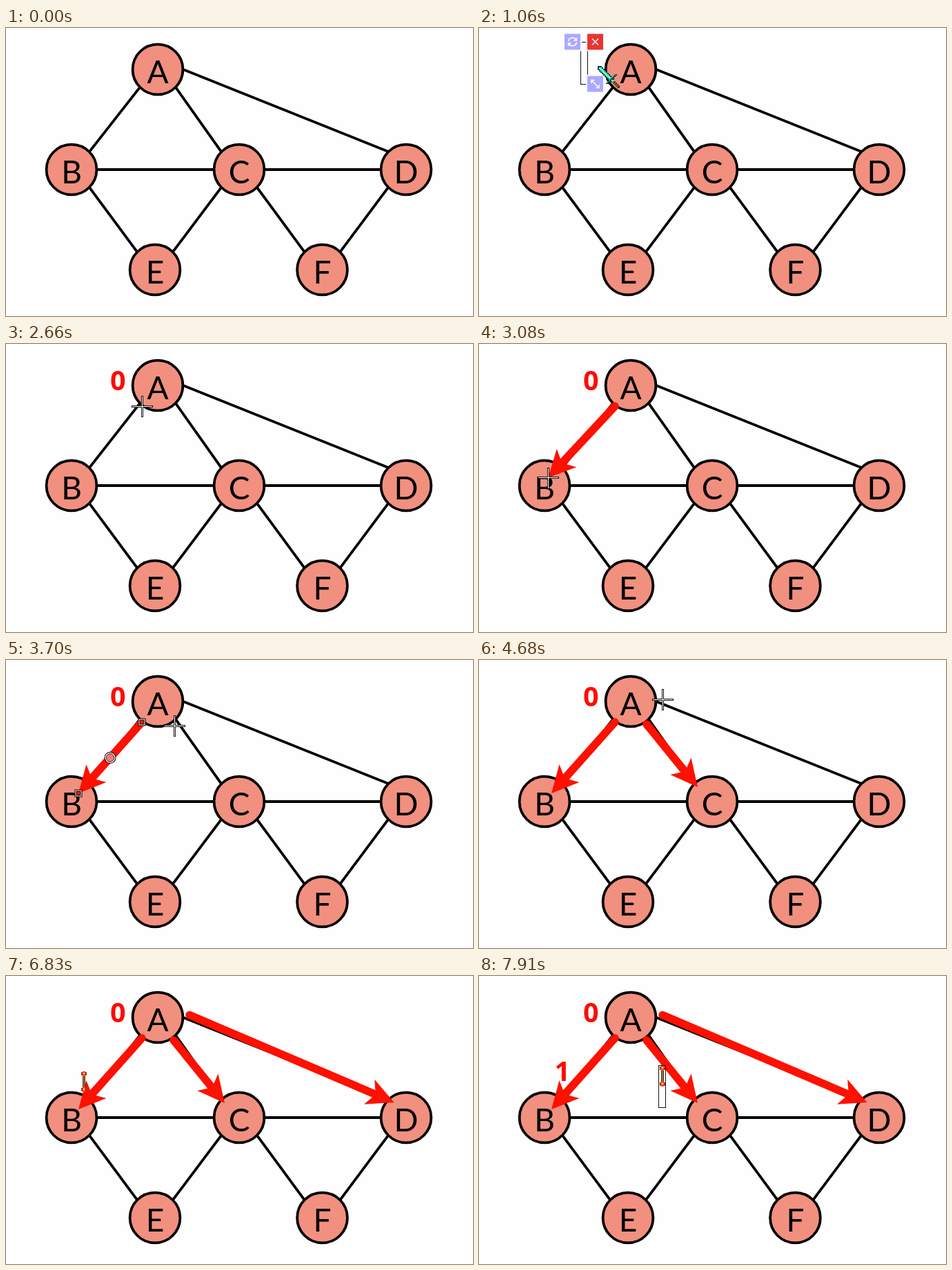
An HTML page for the animation above (8000 ms loop, 677 by 417 pixels).

```html
<!DOCTYPE html>
<html lang="en">
<head>
<meta charset="utf-8">
<title>Graph traversal</title>
<style>
  html, body { margin: 0; width: 100%; height: 100%; overflow: hidden; background: #fefefe; }
  svg { display: block; width: 677px; height: 417px; }
  .edge { stroke: #000; stroke-width: 3.8; }
  .node { fill: #f1907f; stroke: #000; stroke-width: 3.8; }
  .name { font: 46px Lato, "Open Sans", sans-serif; text-anchor: middle; }
  .digit { font: bold 39.5px "Open Sans", "Noto Sans", sans-serif; fill: #ff0a00; }
  .arrow { fill: #ff1000; stroke: none; }
  .shaft { stroke: #ff1000; stroke-width: 11.5; stroke-linecap: round; }
  .frame { fill: none; stroke: #111; shape-rendering: crispEdges; }
  .pixel { shape-rendering: crispEdges; }
  .glyph { fill: none; stroke: #fff; stroke-width: 1.5; }
</style>
</head>
<body>
<svg viewBox="0 0 677 417">
  <g id="graph"></g>
  <g id="arrows"></g>
  <g id="labels"></g>
  <g id="boxes"></g>
  <g id="grips"></g>
  <g id="cursors"></g>
</svg>
<script>
const LOOP = 8000;
const byId = id => document.getElementById(id);

function add(parent, tag, attrs = {}, text = '') {
  const el = document.createElementNS('http://www.w3.org/2000/svg', tag);
  set(el, attrs);
  el.textContent = text;
  return parent.appendChild(el);
}
function set(el, attrs) {
  for (const key in attrs) el.setAttribute(key, attrs[key]);
}
const show = (el, on) => { el.style.display = on ? '' : 'none'; };
const within = (t, [from, to]) => t >= from && t < to;
const move = (el, x, y) => el.setAttribute('transform', `translate(${x} ${y})`);

// Position on a track of [time, x, y] points, or null outside it
function along(track, t) {
  for (let i = 1; i < track.length; i++) {
    const [t0, x0, y0] = track[i - 1], [t1, x1, y1] = track[i];
    if (t >= t0 && t < t1) {
      const k = (t - t0) / (t1 - t0);
      return [x0 + (x1 - x0) * k, y0 + (y1 - y0) * k];
    }
  }
  return null;
}

// Graph
const nodes = {
  A: [220, 60], B: [95, 205], C: [338, 205],
  D: [580, 205], E: [216, 350], F: [458.5, 350]
};
// Each edge: node, side, node, side
const edges = [
  ['A', [-1, 1], 'B', [1, -1]], ['A', [1, 1], 'C', [-1, -1]],
  ['A', [1.4, 0], 'D', [-1, -1]], ['B', [1.4, 0], 'C', [-1.4, 0]],
  ['C', [1.4, 0], 'D', [-1.4, 0]], ['B', [1, 1], 'E', [-1, -1]],
  ['C', [-1, 1], 'E', [1, -1]], ['C', [1, 1], 'F', [-1, -1]],
  ['D', [-1, 1], 'F', [1, -1]]
];
const rim = (id, side) => nodes[id].map((v, i) => v + 26.3 * side[i]);
for (const [a, sideA, b, sideB] of edges) {
  const [x1, y1] = rim(a, sideA), [x2, y2] = rim(b, sideB);
  add(byId('graph'), 'line', { class: 'edge', x1, y1, x2, y2 });
}
for (const id in nodes) {
  const [cx, cy] = nodes[id];
  add(byId('graph'), 'circle', { class: 'node', cx, cy, r: 36.4 });
  add(byId('graph'), 'text', { class: 'name', x: cx, y: cy + 19.5 }, id);
}

// Cursor tracks
const crossTrack = [
  [2140, 243, 385], [2400, 220, 200], [2560, 192, 97], [2620, 197, 90],
  [2700, 197, 90], [2940, 97, 194], [3230, 104, 193], [3410, 105, 194],
  [3600, 230, 71], [3700, 244, 95], [3750, 244, 95], [4200, 318, 188],
  [4250, 317, 184], [4350, 317, 184], [4560, 263, 34], [4670, 266, 57],
  [4720, 266, 57], [5050, 538, 170], [5290, 562, 183], [5520, 562, 183]
];
const leaveTrack = [[5560, 562, 183], [5700, 564, 354]];
const sizeTrack = [[5520, 562, 183], [5560, 562, 183]];
const beamTracks = [
  [[130, 73, 400], [450, 128, 185], [700, 166, 26], [780, 148, 21], [940, 148, 21]],
  [[6460, 116, 373], [6880, 107, 107], [7350, 107, 107]],
  [[7700, 236, 134], [7850, 264, 130], [7905, 261, 130], [LOOP, 261, 130]]
];
const swordTracks = [
  [[940, 150, 34], [1040, 172, 55], [1080, 172, 55], [1350, 204, 118],
   [1550, 256, 290], [1720, 262, 410]],
  [[7350, 108, 108], [7480, 122, 116], [7700, 234, 136]]
];

// Drawn arrows with their selection grips
const arrows = [
  { from: [197, 90], to: [105, 193], drag: [2700, 3230], picked: [3410, 3740] },
  { from: [243, 93], to: [317, 184], drag: [3750, 4250], picked: [4270, 4660] },
  { from: [266, 56.5], to: [562.5, 183], drag: [4720, 5290], picked: [5520, 6470] }
];
function grip(parent, x, y) {
  const g = add(parent, 'g', { transform: `translate(${x} ${y})` });
  add(g, 'rect', { x: -5.5, y: -5.5, width: 11, height: 11 });
  add(g, 'rect', { x: -4.5, y: -4.5, width: 9, height: 9, fill: '#fff' });
  add(g, 'rect', { x: -3, y: -3, width: 6, height: 6, fill: '#e02018', stroke: '#000' });
}
for (const a of arrows) {
  a.el = add(byId('arrows'), 'g');
  a.shaft = add(a.el, 'line', { class: 'shaft', x1: a.from[0], y1: a.from[1] });
  a.head = add(a.el, 'path', { class: 'arrow', d: 'M0 0L-39 -19.5L-29 0L-39 19.5Z' });
  a.grips = add(byId('grips'), 'g');
  const cx = (a.from[0] + a.to[0]) / 2, cy = (a.from[1] + a.to[1]) / 2;
  add(a.grips, 'circle', { cx, cy, r: 8.5 });
  add(a.grips, 'circle', { cx, cy, r: 7.5, fill: '#fff' });
  add(a.grips, 'circle', { cx, cy, r: 5.8, fill: '#f97a72', stroke: '#222' });
  grip(a.grips, ...a.from);
  grip(a.grips, ...a.to);
}
function drawArrow(a, t) {
  show(a.el, t > a.drag[0]);
  show(a.grips, within(t, a.picked));
  const [x, y] = within(t, a.drag) ? along(crossTrack, t) : a.to;
  const dx = x - a.from[0], dy = y - a.from[1], len = Math.hypot(dx, dy);
  const size = Math.min(1, len / 45);
  const k = len ? Math.max(0, 1 - 26 * size / len) : 0;
  set(a.shaft, { x2: a.from[0] + dx * k, y2: a.from[1] + dy * k });
  const turn = Math.atan2(dy, dx) * 180 / Math.PI;
  a.head.setAttribute('transform', `translate(${x} ${y}) rotate(${turn}) scale(${size})`);
}

// Labels and their text boxes
const labels = [
  { text: '0', x: 151, y: 66.5, from: 1300 },
  { text: '1', x: 109.5, y: 152, from: 7450 }
];
for (const l of labels)
  l.el = add(byId('labels'), 'text', { class: 'digit', x: l.x, y: l.y }, l.text);

const boxes = [
  { x: 147, y: 20, open: [780, 2140], tools: [940, 1500], typed: 1300 },
  { x: 105, y: 105, open: [7350, 7850], tools: [7350, 7620], typed: 7450 },
  { x: 260, y: 129, open: [7905, LOOP], tools: [LOOP, LOOP], typed: LOOP }
];
function button(parent, color, glyph) {
  const g = add(parent, 'g');
  add(g, 'rect', { x: -13.5, y: -13.5, width: 27, height: 27, fill: '#fefefe' });
  add(g, 'rect', { x: -11.5, y: -11.5, width: 23, height: 23, fill: color });
  add(g, 'path', { class: 'glyph', d: glyph });
  return g;
}
const spinGlyph = 'M-6 -1A6 6 0 0 1 5 -3M6 -6V-2H2M6 1A6 6 0 0 1 -5 3M-6 6V2H-2';
const crossGlyph = 'M-4.5 -4.5L4.5 4.5M4.5 -4.5L-4.5 4.5';
const sizeGlyph = 'M-5 -5L5 5M-5.5 -1V-5.5H-1M5.5 1V5.5H1';
for (const b of boxes) {
  b.el = add(byId('boxes'), 'g');
  b.frame = add(b.el, 'rect', { class: 'frame', x: b.x + .5, y: b.y + .5, height: 61 });
  b.bar = add(b.el, 'g');
  b.spin = button(b.bar, '#aaaaff', spinGlyph);
  b.close = button(b.bar, '#e83530', crossGlyph);
  b.size = button(b.bar, '#aaaaff', sizeGlyph);
}
function drawBox(b, t) {
  show(b.el, within(t, b.open));
  show(b.bar, within(t, b.tools));
  const w = t < b.typed ? 10 : 33, right = b.x + w + 11.5;
  b.frame.setAttribute('width', w);
  move(b.spin, b.x - 11.5, b.y);
  move(b.close, right, b.y);
  move(b.size, right, b.y + 61);
}
const caret = add(byId('boxes'), 'rect', { class: 'pixel', x: 175, y: 41, width: 2, height: 20 });

// Cursors
const layer = byId('cursors');
const cursor = () => add(layer, 'g', { class: 'pixel' });
const block = (g, x, y, width, height, fill) => add(g, 'rect', { x, y, width, height, fill });

const cross = cursor();
block(cross, -15, -1.5, 31, 3, '#111');
block(cross, -1.5, -15, 3, 31, '#111');
block(cross, -14, -.5, 29, 1, '#fff');
block(cross, -.5, -14, 1, 29, '#fff');

const resize = add(layer, 'g');
add(resize, 'path', {
  d: 'M0 -16L5 -9H1.5V10H5L0 16L-5 10H-1.5V-9H-5Z',
  fill: '#b9b9b9', stroke: '#555', 'stroke-width': 1
});

const beam = cursor();
block(beam, 3, 5, 4, 20, '#4a2a12');
block(beam, 4, 6, 2, 18, '#a0743e');
for (const y of [0, 23]) {
  block(beam, 1, y + 1, 8, 5, '#c52a12');
  block(beam, 3, y, 4, 7, '#e8541c');
  block(beam, 4, y + 2, 2, 2, '#ffe9c0');
}

const sword = cursor();
const dot = (x, y, fill) => block(sword, x * 2, y * 2, 2, 2, fill);
block(sword, 0, 0, 6, 2, '#0e3f36');
block(sword, 0, 0, 2, 6, '#0e3f36');
for (let i = 1; i < 11; i++) {
  dot(i + 1, i - 1, '#0e3f36');
  dot(i - 1, i + 1, '#0e3f36');
  dot(i + 1, i, '#33ebcb');
  dot(i, i + 1, '#2bc7ac');
  dot(i, i, '#9ff8e5');
}
for (let i = 0; i < 7; i++) {
  dot(13 - i, 6 + i, '#0e3f36');
  dot(12 - i, 6 + i, '#27786a');
}
for (let i = 11; i < 15; i++) {
  dot(i, i, '#896727');
  dot(i + 1, i, '#493615');
  dot(i, i + 1, '#684e1e');
}
dot(15, 15, '#0e3f36');

function follow(el, tracks, t) {
  const at = tracks.map(track => along(track, t)).find(Boolean);
  show(el, at);
  if (at) move(el, ...at);
}

function draw() {
  const t = performance.now() % LOOP;
  arrows.forEach(a => drawArrow(a, t));
  boxes.forEach(b => drawBox(b, t));
  labels.forEach(l => show(l.el, t >= l.from));
  show(caret, within(t, [1370, 1870]));
  follow(cross, [crossTrack, leaveTrack], t);
  follow(resize, [sizeTrack], t);
  follow(beam, beamTracks, t);
  follow(sword, swordTracks, t);
  requestAnimationFrame(draw);
}
draw();
</script>
</body>
</html>
```
